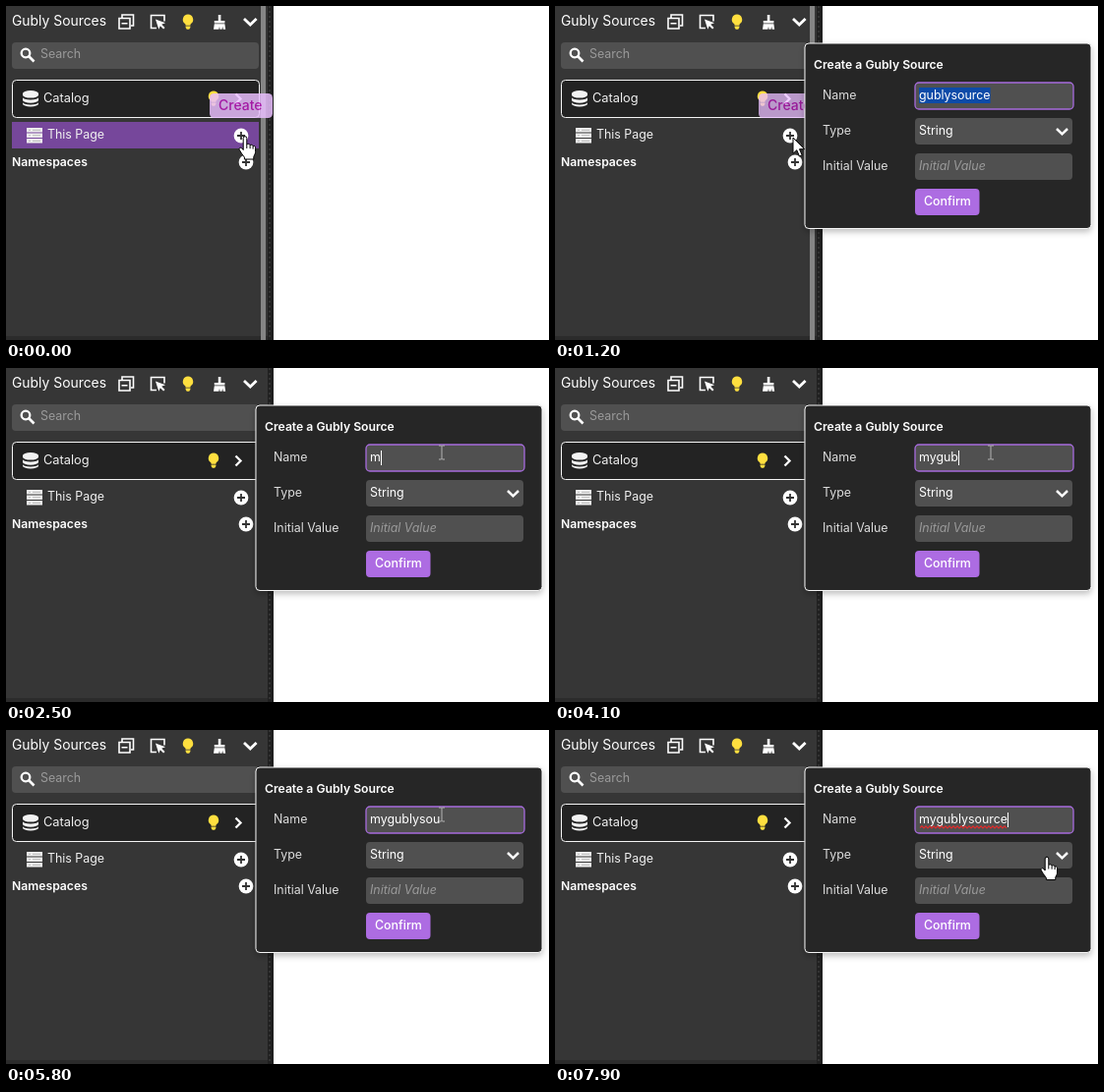
An HTML page for the animation above (8000 ms loop, 552x340 px).

```html
<!DOCTYPE html>
<html lang="en">
<head>
<meta charset="utf-8">
<title>Create a source</title>
<style>
  html, body { margin: 0; width: 100%; height: 100%; overflow: hidden; background: #fff; }
  svg { display: block; width: 552px; height: 340px; font: 12.4px Inter, sans-serif; }
  text { fill: #f0f0f0; white-space: pre; }
  .line { fill: none; stroke: #fff; stroke-width: 1.6; }
  .bold { font-size: 12.2px; font-weight: 600; fill: #fff; }
  .dim { fill: #9a9a9a; }
  .label { fill: #dcdcdc; }
  .field { fill: #505050; }
  #cursor path { stroke: #000; stroke-width: 1; fill: #fff; stroke-linejoin: round; }
  #cursor #ibeam { fill: none; stroke: #b4b4b4; }
</style>
</head>
<body>
<svg viewBox="0 0 552 340">
  <defs>
    <g id="bulb" fill="#ffdf3f">
      <path d="M0-7.5a5.3 5.3 0 0 1 3 9.6q-.6.6-.6 1.7h-4.8q0-1.1-.6-1.7a5.3 5.3 0 0 1 3-9.6z"/>
      <path d="M-2.4 4.6h4.8v1.5l-1.2 1.6h-2.4l-1.2-1.6z"/>
    </g>
    <g id="plus">
      <circle r="7.4" fill="#fff"/>
      <path d="M-4 0H4M0-4V4" stroke="#333" stroke-width="1.8"/>
    </g>
    <filter id="shadow" x="-10%" y="-10%" width="120%" height="125%">
      <feDropShadow dx="0" dy="3" stdDeviation="3" flood-opacity=".25"/>
    </filter>
  </defs>

  <rect width="552" height="340" fill="#fff"/>
  <rect width="272" height="340" fill="#363636"/>
  <rect x="266" width="6" height="340" fill="#202020"/>
  <path d="M268 0V340" stroke="#333" stroke-width="2" stroke-dasharray="2 3"/>
  <rect y="336" width="266" height="4" fill="#2b2b2b"/>
  <rect id="scroll" x="259" width="5" height="340" fill="#858585"/>

  <text x="6" y="20" font-size="13.9" style="fill:#fff">Gubly Sources</text>
  <g class="line">
    <path d="M115 12.5h11v10.5h-11zM118 12V9h11.500v11H127M117.500 17.800h6"/>
    <path d="M153 22.500h-5.500V9.500h13.500v6"/>
    <path d="M152 13.500l10 3.700-3.800 1.600 3.300 3.300-1.400 1.400-3.300-3.300-1.500 3.600z" fill="#fff" stroke="none"/>
    <path d="M242 13l6.300 6 6.300-6" stroke-width="2.800"/>
  </g>
  <use href="#bulb" x="185" y="16"/>
  <path d="M215.800 9h2.600v6h4v2.400h-10.600V15h4zM211.800 18.200h10.600l.8 5.600h-2.500l-.6-3-.6 3h-2l-.5-3-.6 3h-5.400z" fill="#fff"/>

  <rect class="field" x="6" y="37" width="251" height="27" rx="4"/>
  <circle cx="20" cy="48" r="4.300" class="line" style="stroke-width:2.300"/>
  <path d="M23 51l5.500 5.500" class="line" style="stroke-width:2.600"/>
  <text x="35" y="53" class="dim">Search</text>

  <rect x="6.500" y="75.500" width="251" height="38" rx="4" fill="#232323" stroke="#f4f4f4"/>
  <g fill="#f2f2f2">
    <path d="M17 89a8 3 0 0 1 16 0v1.600a8 3 0 0 1-16 0z"/>
    <path d="M17 93a8 2.600 0 0 0 16 0v2.700a8 3 0 0 1-16 0zM17 98a8 2.600 0 0 0 16 0v1.500a8 3 0 0 1-16 0z"/>
  </g>
  <text x="38" y="98" font-size="12.8">Catalog</text>
  <use href="#bulb" x="211" y="94"/>
  <path d="M233.500 89.500l5 5-5 5" class="line" style="stroke-width:2.300"/>

  <rect id="hover" x="6" y="118" width="251" height="27" fill="#76479b"/>
  <path d="M21 124h16v4.600H21zM21 129.500h16v4.600H21zM21 135h16v4.600H21z" fill="#f0f0f0"/>
  <path d="M23 126.300h2m2 0h8M23 131.800h2m2 0h8M23 137.300h2m2 0h8" stroke="#aaa" stroke-width=".8"/>
  <text x="42" y="135">This Page</text>
  <use href="#plus" x="239" y="132"/>
  <text x="6" y="163" class="bold">Namespaces</text>
  <use href="#plus" x="244" y="159"/>

  <g id="tip">
    <rect x="207" y="89" width="64" height="25" rx="4.500" fill="#eabfff"/>
    <text x="216" y="105.500" font-size="14" font-weight="500" style="fill:#bd18bd">Create</text>
  </g>

  <g id="dialog">
    <rect x="254" y="38" width="291" height="188.500" rx="4" fill="#252525" stroke="#f4f4f4" filter="url(#shadow)"/>
    <text x="263" y="64" class="bold">Create a Gubly Source</text>
    <text x="272" y="95" class="label">Name</text>
    <text x="272" y="131" class="label">Type</text>
    <text x="272" y="167" class="label">Initial Value</text>
    <rect class="field" x="366" y="78" width="161" height="27" rx="4" style="stroke:#a76bdd;stroke-width:1.300"/>
    <rect class="field" x="366" y="114" width="160" height="27" rx="4"/>
    <rect class="field" x="366" y="150" width="160" height="27" rx="4"/>
    <rect id="mark" x="370" y="83" height="16" fill="#0d4ba8"/>
    <text id="name" x="370" y="95" style="fill:#fff"></text>
    <path id="squiggle" fill="none" stroke="#e02b2b" stroke-width="1.200"/>
    <rect id="caret" y="84" width="1" height="15" fill="#fff"/>
    <text x="370" y="131" style="fill:#fff">String</text>
    <path d="M510 125l5.500 5.300 5.500-5.300" class="line" style="stroke-width:2.500"/>
    <text x="370" y="167" class="dim" font-style="italic">Initial Value</text>
    <rect x="366" y="186" width="65.500" height="27" rx="4" fill="#ad6ce2"/>
    <text x="375" y="203" font-weight="500" style="fill:#fff">Confirm</text>
  </g>

  <g id="cursor">
    <path id="arrow" d="M0 0V16.200l3.800-3.500 2.700 6.300 2.700-1.200-2.700-6.100H11.600z"/>
    <path id="hand" d="M-1.800 1.500a1.800 1.800 0 0 1 3.600 0V8c.8-1 3-.8 3.300.6.900-.7 2.800-.3 3 1 1-.5 2.500 0 2.500 1.600v4.300c0 2-1.400 3.500-1.800 5V23H-.6V21c-1.900-2.500-3.900-5-5.200-7.700-.8-1.700 1.200-2.800 2.500-1.500l1.500 1.700zM1.800 8v4M5.100 8.600v3.600M8.100 9.600v3"/>
    <path id="ibeam" d="M-3-7h2.200L0-6.300.8-7H3M0-6.300V6.300M-3 7h2.200L0 6.300.8 7H3"/>
  </g>
</svg>
<script>
const LOOP = 8000, STEP = 100;
const $ = id => document.getElementById(id);
const show = (id, on) => { $(id).style.display = on ? '' : 'none'; };

const PRESET = 'gublysource', TYPED = 'my' + PRESET;
// [time, letters typed]
const KEYS = [[2400, 1], [2700, 2], [3700, 3], [4100, 5], [4300, 6], [4500, 7],
  [4700, 8], [4900, 9], [5200, 10], [6000, 11], [6100, 12], [6300, 13]];
// [time, x, y]
const PATH = [[0, 243, 133], [500, 237, 133], [1100, 236, 133], [1200, 242, 134],
  [1400, 242, 134], [2200, 443, 86], [7100, 443, 86], [7600, 519, 137],
  [7700, 519, 137], [7900, 500, 129.5], [8000, 500, 129.5]];
// [time, opacity]
const FADE = [[0, .84], [400, 1], [1100, 1], [1200, .76], [1600, 0], [8000, 0]];

function sample(table, t) {
  const i = table.findIndex((row, n) => n && t < row[0]);
  const [a, b] = [table[i - 1], table[i]];
  const p = (t - a[0]) / (b[0] - a[0]), e = p * p * (3 - 2 * p);
  return a.slice(1).map((v, k) => v + (b[k + 1] - v) * e);
}

function pointer(t, x, y) {
  if (t < 1000) return 'hand';
  if (x > 366 && y > 78 && y < 105) return 'ibeam';
  if (x > 366 && y > 114 && y < 141) return 'hand';
  return 'arrow';
}

function squiggle(from, to) {
  let d = `M${from} 99.5`;
  for (let x = from + 2, up = true; x <= to; x += 2, up = !up) d += `L${x} ${up ? 97.8 : 99.8}`;
  return d;
}

function render(t) {
  const [x, y] = sample(PATH, t), kind = pointer(t, x, y);
  $('cursor').setAttribute('transform', `translate(${x.toFixed(1)} ${y.toFixed(1)})`);
  for (const k of ['arrow', 'hand', 'ibeam']) show(k, k === kind);

  show('scroll', t < 1700);
  show('hover', t < 1200);
  show('dialog', t >= 1200);
  $('tip').style.opacity = sample(FADE, t)[0];
  if (t < 1200) return;

  const count = KEYS.reduce((n, [at, len]) => t >= at ? len : n, 0);
  const name = $('name');
  name.textContent = count ? TYPED.slice(0, count) : PRESET;
  const width = name.getComputedTextLength();
  $('mark').setAttribute('width', width);
  show('mark', !count);
  $('caret').setAttribute('x', Math.round(370 + width));
  show('caret', count && !(t >= 5800 && t < 6000));
  $('squiggle').setAttribute('d', squiggle(371, 370 + width));
  show('squiggle', t >= 6400);
}

const start = performance.now();
function tick() {
  const t = (performance.now() - start) % LOOP;
  render(Math.floor(t / STEP) * STEP);
  requestAnimationFrame(tick);
}
tick();
</script>
</body>
</html>
```
